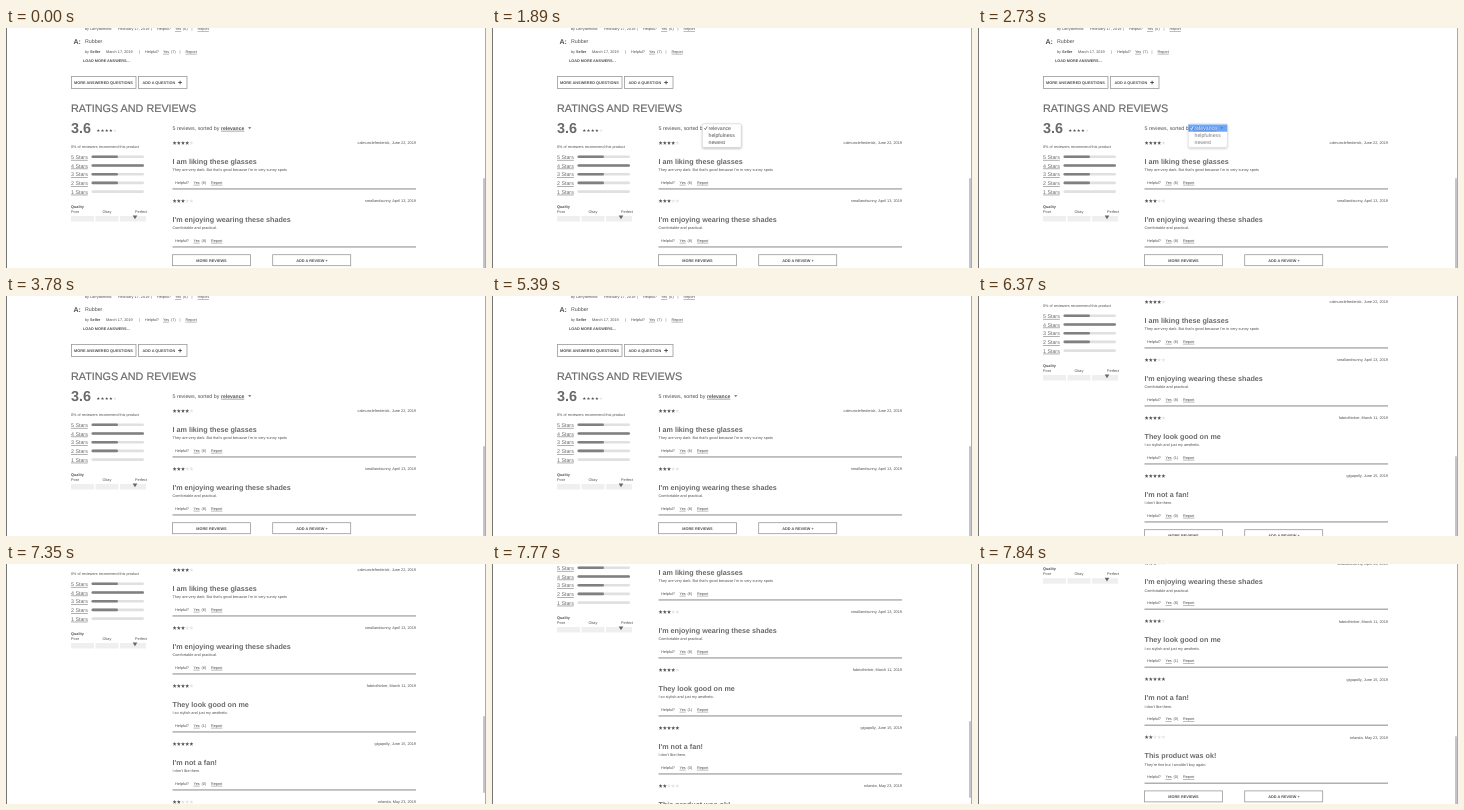
Animation, 480 px wide and 240 px high, one loop 8 s. Source, as an HTML page:

```html
<!DOCTYPE html>
<html lang="en">
<head>
<meta charset="utf-8">
<title>Ratings and reviews</title>
<style>
html, body { margin: 0; width: 100%; height: 100%; overflow: hidden; background: #fff; }
svg { display: block; width: 480px; height: 240px; }
text { font-family: "Liberation Sans", Arial, sans-serif; fill: #505050; white-space: pre; text-rendering: geometricPrecision; }
.b { font-weight: bold; }
.u { text-decoration: underline; }
.h { fill: #6a6a6a; }
.w { stroke: #6a6a6a; stroke-width: .2px; }
.r { text-anchor: end; }
.m { text-anchor: middle; }
</style>
</head>
<body>
<svg id="stage" viewBox="0 0 480 240"></svg>
<script>
const LOOP = 8000, PITCH = 58;

// y is the middle of the capitals
const text = (x, y, size, str, cls = '') =>
  `<text x="${x}" y="${y + size * 0.36}" font-size="${size}" class="${cls}">${str}</text>`;
const rect = (x, y, w, h, fill, more = '') =>
  `<rect x="${x}" y="${y}" width="${w}" height="${h}" fill="${fill}" ${more}/>`;
const button = (x, y, w, h) => rect(x, y, w, h, '#fff', 'stroke="#999" stroke-width=".8"');

function star(x, y, r, fill) {
  const pts = Array.from({ length: 10 }, (_, i) => {
    const a = i * Math.PI / 5, d = i % 2 ? r * 0.42 : r;
    return (x + d * Math.sin(a)).toFixed(2) + ',' + (y - d * Math.cos(a)).toFixed(2);
  });
  return `<polygon points="${pts.join(' ')}" fill="${fill}"/>`;
}
const stars = (x, y, n, r = 2.1) =>
  [0, 1, 2, 3, 4].map(i => star(x + i * 4.2, y, r, i < n ? '#5a5a5a' : '#e4e4e4')).join('');

const votes = (x, y, n, gap = 4.5) =>
  text(x, y, 3.8, 'Helpful?') + text(x + 14 + gap, y, 3.8, 'Yes', 'u') +
  text(x + 22 + gap, y, 3.8, `(${n})`);

function answer(y, name, date, dateX, n) {
  const x = dateX + 33;
  return text(79, y, 3.8, 'by') + text(84, y, 3.8, name, name === 'Seller' ? 'b' : '') +
    text(dateX, y, 3.85, date) + text(x, y, 3.8, '|') + votes(x + 6, y, n, 4) +
    text(x + 40.5, y, 3.8, '|') + text(x + 46.5, y, 3.8, 'Report', 'u');
}

const reviews = [
  [4, 'calmunclefrederick, June 22, 2019', 'I am liking these glasses',
    "They are very dark. But that's good because I'm in very sunny spots", 6],
  [3, 'smallandsunny, April 13, 2019', "I'm enjoying wearing these shades", 'Comfortable and practical.', 8],
  [4, 'fabricthinker, March 11, 2019', 'They look good on me', 'I so stylish and just my aesthetic.', 1],
  [5, 'gigapolly, June 15, 2019', "I'm not a fan!", "I don't like them.", 0],
  [2, 'orlanda, May 23, 2019', 'This product was ok!', "They're fine but I wouldn't buy again.", 0]
];

const review = ([n, by, title, body, yes], i) => {
  const y = 115 + i * PITCH;
  return `<g class="review">${stars(168.6, y, n)}${text(410, y, 3.85, by, 'r')}` +
    text(166.5, y + 18, 7.2, title, 'b h') + text(166.5, y + 27, 3.82, body) +
    votes(169, y + 39.5, yes) + text(205, y + 39.5, 3.8, 'Report', 'u') +
    rect(166.5, y + 45.5, 243.5, 0.9, '#7c7c7c') + '</g>';
};

const bar = (fill, i) => {
  const y = 129 + i * 8.7;
  return text(65, y, 5.3, `${5 - i} Stars`, 'u h') +
    rect(85.5, y - 1.5, 52.5, 2.6, '#e0e0e0', 'rx="1.3"') +
    rect(85.5, y - 1.5, fill, 2.6, '#808080', 'rx="1.3"');
};

const chevron = (x, y, w, h) =>
  `<path d="M${x - w} ${y}h${2 * w}l${-w} ${h}z" fill="#666"/>`;

const page = [
  answer(1, 'Larrydominic', 'February 17, 2019', 112, 6),
  text(67.5, 13.2, 7, 'A:', 'b'), text(79, 13.5, 5.3, 'Rubber'),
  answer(23.5, 'Seller', 'March 17, 2019', 100, 7),
  text(77, 32.8, 3.8, 'LOAD MORE ANSWERS...', 'b'),
  button(65.5, 48.5, 64.5, 12), text(68, 54.5, 3.87, 'MORE ANSWERED QUESTIONS', 'b'),
  button(132.5, 48.5, 48.5, 12), text(136.5, 54.5, 3.8, 'ADD A QUESTION', 'b'),
  rect(172.3, 54.1, 3.6, 0.9, '#444'), rect(173.65, 52.75, 0.9, 3.6, '#444'),
  text(65, 80, 10.8, 'RATINGS AND REVIEWS', 'h w'),
  text(65, 99.7, 14.4, '3.6', 'b h'), stars(92.3, 102.6, 4, 1.7),
  text(65, 118.5, 3.75, '0% of reviewers recommend this product'),
  ...[26.5, 52.5, 26.5, 26.5, 0].map(bar),
  text(65, 178.7, 3.8, 'Quality', 'b'),
  text(65, 183.4, 3.8, 'Poor'), text(96.5, 183.4, 3.8, 'Okay'), text(129, 183.4, 3.8, 'Perfect'),
  rect(65, 188, 23, 5.5, '#efefef'), rect(89.5, 188, 23, 5.5, '#efefef'), rect(114, 188, 26, 5.5, '#efefef'),
  chevron(129, 187.6, 2.3, 3.6),
  text(166.5, 100, 5.28, '5 reviews, sorted by'), text(215, 100, 5.05, 'relevance', 'b u'),
  chevron(243.7, 99.2, 1.7, 1.9),
  ...reviews.map(review),
  '<g id="foot">',
  button(166.5, 226.7, 78, 11), text(205.5, 232.2, 3.85, 'MORE REVIEWS', 'b m'),
  button(266.7, 226.7, 78, 11), text(306, 232.2, 3.85, 'ADD A REVIEW +', 'b m'),
  '</g>'
].join('');

const menu = rect(210.3, 95.8, 39, 23.6, '#fff',
    'rx="1.5" stroke="#ccc" stroke-width=".5" style="filter:drop-shadow(0 1px 1px #0004)"') +
  rect(210.3, 96.5, 39, 7.2, '#4087f3', 'id="mark"') +
  '<path id="tick" d="M212.3 100.2l1.1 1.5 1.8-3.3" fill="none" stroke-width=".7"/>' +
  ['relevance', 'helpfulness', 'newest'].map((s, i) => text(216.5, 100.1 + i * 7, 5.2, s)).join('');

const stage = document.getElementById('stage');
stage.innerHTML = `<g id="page">${page}<g id="menu">${menu}</g></g>` +
  rect(0, 0, 1, 240, '#777') + rect(479, 0, 1, 240, '#aaa') +
  rect(477, 0, 2, 0, '#c4c4cc', 'id="thumb" rx="1"');

const $ = id => document.getElementById(id);
const pageEl = $('page'), menuEl = $('menu'), mark = $('mark'), tick = $('tick'),
  foot = $('foot'), thumb = $('thumb'),
  firstRow = menuEl.querySelector('text'), items = [...document.querySelectorAll('.review')];

// start time, scroll, reviews shown, thumb top, thumb length
const states = [
  [0, 0, 2, 150, 96],
  [5810, 0, 4, 126, 83],
  [6300, 1, 4, 126.3, 83],
  [6370, 109, 4, 160, 83],
  [7350, 109, 5, 152, 77],
  [7770, 125, 5, 157, 77],
  [7840, 173.8, 5, 172, 77]
];

function draw(t) {
  const [, scroll, shown, top, len] = states.findLast(s => t >= s[0]);
  pageEl.setAttribute('transform', `translate(0 ${-scroll})`);
  items.forEach((el, i) => el.style.display = i < shown ? '' : 'none');
  foot.setAttribute('transform', `translate(0 ${(shown - 2) * PITCH})`);
  thumb.setAttribute('y', top);
  thumb.setAttribute('height', len);

  // the chosen row blinks once, then the menu fades
  const fade = Math.floor(Math.max(0, t - 2660) / 70) / 4;
  menuEl.style.opacity = t < 1470 ? 0 : Math.max(0, 1 - fade);
  const lit = t < 1890 || (t >= 2170 && t < 2590) || t >= 2660;
  mark.style.opacity = lit ? 1 : 0;
  firstRow.style.fill = tick.style.stroke = lit ? '#fff' : '#505050';
}

function loop() {
  draw(performance.now() % LOOP);
  requestAnimationFrame(loop);
}
loop();
</script>
</body>
</html>
```
